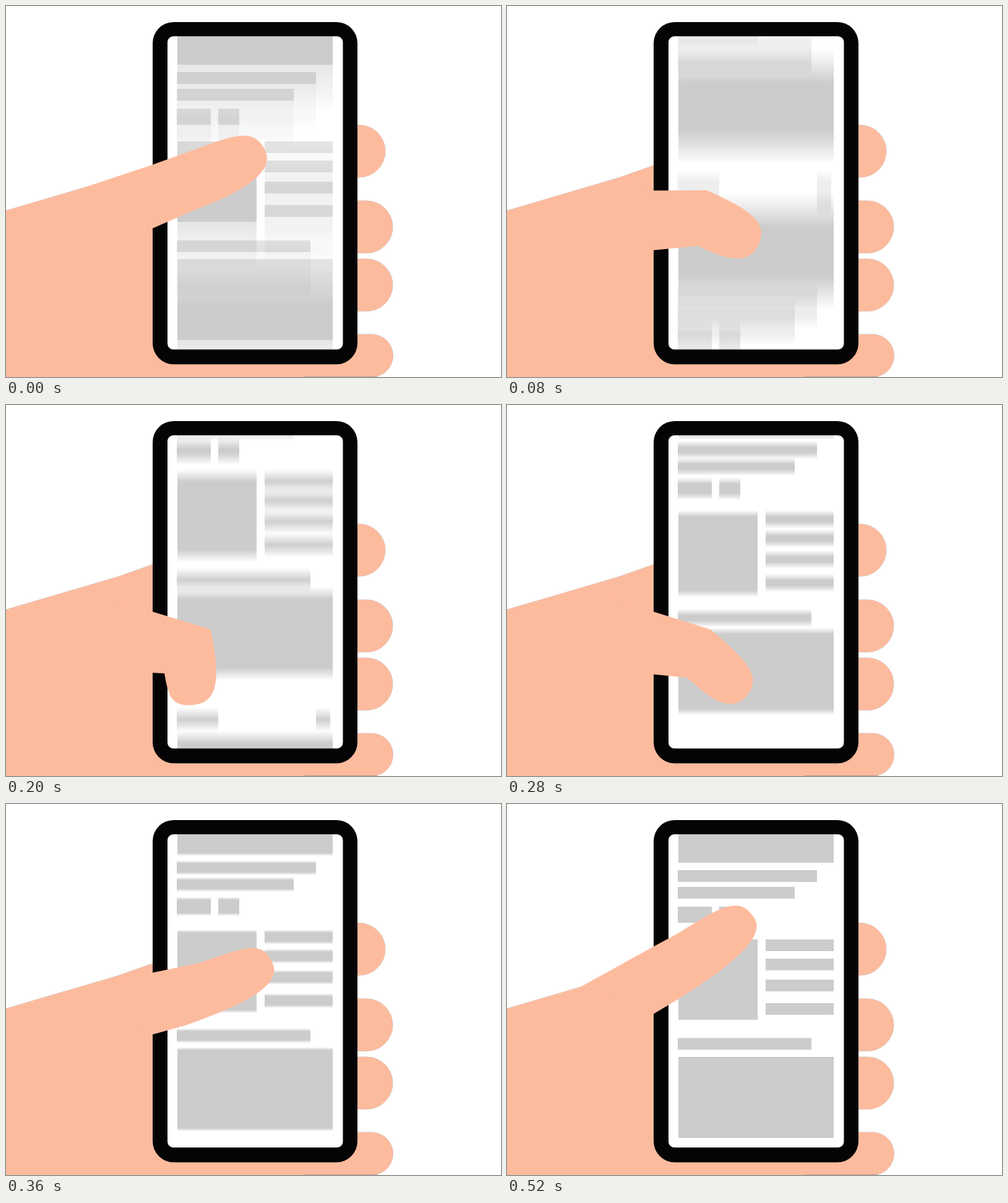
Recreate the animation shown at these times as an HTML page with a canvas. Size 800x600 px, loop 600 ms.

```html
<!DOCTYPE html>
<html lang="en">
<head>
<meta charset="utf-8">
<title>Scrolling thumb</title>
<style>
  html, body { margin: 0; width: 100%; height: 100%; overflow: hidden; background: #fff; }
  canvas { display: block; }
</style>
</head>
<body>
<canvas id="stage" width="800" height="600"></canvas>
<script>
const ctx = document.getElementById('stage').getContext('2d');
const STEP = 40, LOOP = 600, LAST = 13, PERIOD = 680;
const SKIN = '#fdbb9e', EDGE = 'rgba(120,120,120,.45)';

// One period of the page, shifted down by d
function drawBlocks(d) {
  const block = (left, top, right, height = 19) =>
    ctx.fillRect(left, Math.round(top + d), right - left, height);
  block(276, -76, 343);
  block(501, -76, 524);
  block(277, -38, 528, 133);
  block(276, 107, 501);
  block(276, 134, 465);
  block(276, 166, 331, 26);
  block(343, 166, 377, 26);
  block(277, 219, 405, 130);
  for (const y of [219, 250, 284, 322]) block(418, y, 528);
  block(276, 378.5, 492);
  block(277, 409, 528, 131);
}

// Fast start, long settle: cubic-bezier(.155, 1, .644, 1)
function ease(x) {
  if (x <= 0) return 0;
  if (x >= 1) return 1;
  let lo = 0, hi = 1;
  for (let i = 0; i < 24; i++) {
    const s = (lo + hi) / 2, r = 1 - s;
    if (3 * .155 * s * r * r + 3 * .644 * s * s * r + s ** 3 < x) lo = s; else hi = s;
  }
  return 1 - (1 - lo) ** 3;
}

// Half-frame shutter: each of 51 samples darkens the page by one level
function drawPage(f) {
  const shades = 51;
  ctx.save();
  ctx.beginPath();
  ctx.rect(260, 48, 285, 508);
  ctx.clip();
  ctx.globalCompositeOperation = 'difference';
  ctx.fillStyle = 'rgb(1,1,1)';
  for (let n = 0; n < shades; n++) {
    const d = PERIOD * ease((f + ((n + .5) / shades - .5) / 2) / LAST);
    drawBlocks(d);
    drawBlocks(d - PERIOD);
  }
  ctx.restore();
}

// The thumb is a base at the phone's edge, a knuckle, a tip and a crease below
const pose = (at, upper, lower, knuckle, tip, crease) =>
  ({ at, v: [upper, lower, ...knuckle, ...tip, ...crease] });

const poses = [
  pose(0, 257, 360, [300, 234], [420, 237], [300, 332]),
  pose(2, 298.5, 395, [323, 298], [407, 385], [308, 388]),
  pose(3, 317, 414, [329, 330], [339, 455], [272, 411]),
  pose(5, 334, 433, [331, 363], [309, 484], [256, 434]),
  pose(7, 334, 435.5, [329, 363], [388, 470], [291, 441]),
  pose(9, 273, 373, [313, 257], [432, 261], [290, 358]),
  pose(LAST, 231, 340, [275, 210], [400, 185], [276, 316])
];
const rest = poses[poses.length - 1];

function slope(i, j) {
  if (poses[i] === rest) return 0;
  const prev = i ? poses[i - 1] : { at: -1, v: rest.v }, next = poses[i + 1];
  return (next.v[j] - prev.v[j]) / (next.at - prev.at);
}

// Smooth (Hermite) motion through the poses
function poseAt(f) {
  let i = 0;
  while (i < poses.length - 2 && f >= poses[i + 1].at) i++;
  const a = poses[i], b = poses[i + 1], h = b.at - a.at, u = (f - a.at) / h, w = 1 - u;
  return a.v.map((p, j) =>
    p * w * w * (1 + 2 * u) + b.v[j] * u * u * (3 - 2 * u) +
    h * u * w * (w * slope(i, j) - u * slope(i + 1, j)));
}

function drawThumb(f) {
  const [upper, lower, kx, ky, tx, ty, cx, cy] = poseAt(f);
  const ax = tx - (kx + cx) / 2, ay = ty - (ky + cy) / 2;
  const round = 44 / Math.hypot(ax, ay), nx = ay * round, ny = -ax * round;
  ctx.beginPath();
  ctx.moveTo(118, 296.3);
  ctx.lineTo(236, upper);
  ctx.lineTo(kx, ky);
  ctx.bezierCurveTo(kx + .6 * ax, ky + .6 * ay, tx + nx, ty + ny, tx, ty);
  ctx.bezierCurveTo(tx - nx, ty - ny, cx + .4 * ax, cy + .4 * ay, cx, cy);
  ctx.lineTo(236, lower);
  ctx.fillStyle = SKIN;
  ctx.fill();
}

const hand = new Path2D('M0 331L118 296.3L180 278L237 258H250V557H560V600H0Z');
function finger(top, right, r) {
  hand.roundRect(555, top, right - 555, 2 * r, [0, r, r, 0]);
}
finger(192.5, 613, 42.3);
finger(315, 625, 42.3);
finger(409, 625, 42.3);
finger(531, 625.5, 34.5);

const phone = new Path2D();
phone.roundRect(237, 26, 331, 553.5, 34);
phone.roundRect(261, 49, 283.5, 506.5, 9.5);

function draw(f) {
  ctx.fillStyle = '#fff';
  ctx.fillRect(0, 0, 800, 600);
  drawPage(f);
  ctx.strokeStyle = EDGE;
  ctx.stroke(hand);
  ctx.fillStyle = SKIN;
  ctx.fill(hand);
  ctx.fillStyle = '#a08a80';
  ctx.fillRect(482, 599.3, 118, .7);
  ctx.fillStyle = '#040404';
  ctx.fill(phone, 'evenodd');
  drawThumb(f);
}

let shown = -1;
function tick() {
  const f = Math.min(LAST, Math.floor(performance.now() % LOOP / STEP));
  if (f !== shown) draw(shown = f);
  requestAnimationFrame(tick);
}
tick();
</script>
</body>
</html>
```
